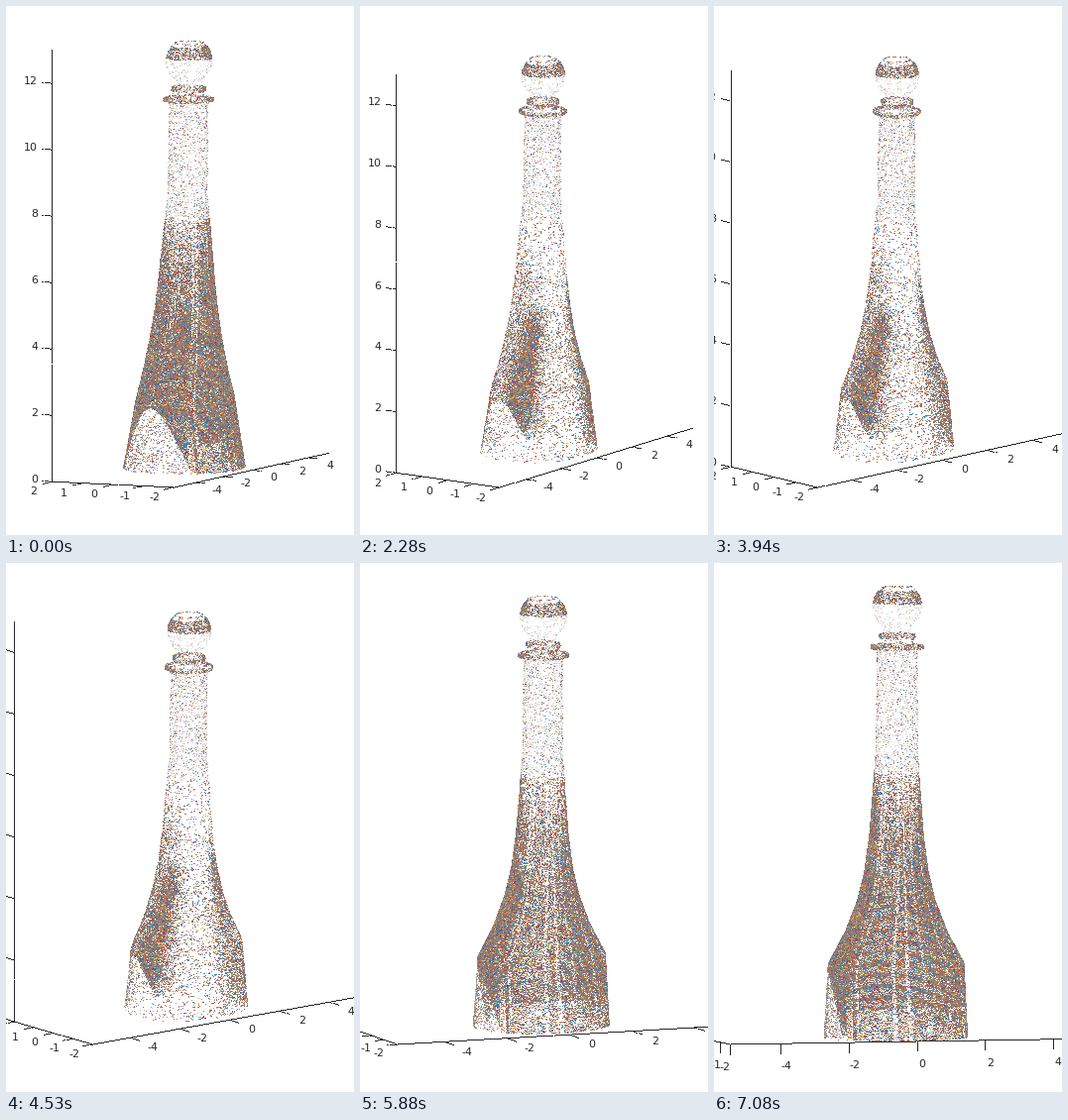
Recreate the animation shown at these times as a matplotlib script. Size 351 px wide and 534 px high, loop 8.56 s.

```python
import numpy as np
import matplotlib.pyplot as plt
from matplotlib.animation import FuncAnimation
from matplotlib.colors import to_rgb

W, H, DPI = 351, 534, 64
LOOP, INTERVAL = 8560, 40
START, STEP, MOVES = 792, 149.2, 43
XMAX, YMAX, ZMAX = 2, 5.5, 13
BOX_HEIGHT, CENTER_X, BOTTOM = 476, 186, 486
INK = "#262626"

# Camera path: time in ms, azimuth and elevation in degrees
KEY_T = [650, 1390, 3200, 4530, 5270, 6340, 7050]
KEY_AZ = [24.9, 29.6, 38.7, 52, 62, 72.8, 74.5]
KEY_EL = [5.9, 10.9, 13.1, 13.2, 11.3, 5.5, 3.3]

# Bottle outline: height, half width along x, half width along y
PROFILE = np.array([
    (0, 1.77, 2.05), (2.1, 1.34, 1.96), (3, 1.2, 1.46), (3.9, 1.07, 1.1),
    (4.7, .96, .9), (5.7, .85, .76), (7.05, .73, .66), (8.2, .59, .59),
    (10.85, .57, .57), (11.02, .62, .62), (11.05, .75, .75), (11.14, .75, .75),
    (11.18, .52, .52), (11.32, .46, .46), (11.36, .52, .52), (11.46, .5, .5),
    (11.5, .4, .4), (11.6, .39, .39)])

PALETTE = {
    "#83604f": .46, "#6f7078": .18, "#0072bd": .1, "#d95319": .11,
    "#edb120": .05, "#7e2f8e": .03, "#77ac30": .02, "#4dbeee": .03,
    "#a2142f": .02}


def bump(v, center, width):
    return np.exp(-((v - center) / width) ** 2)


def ramp(v, low, high):
    return np.clip((v - low) / (high - low), 0, 1)


def between(v, low, high, soft):
    return ramp(v, low, low + soft) * ramp(-v, -high, soft - high)


def make_bottle():
    """Surface points, colours and draw thresholds (steady, low-view extra)."""
    rng = np.random.default_rng(7)
    rows, cols = 420, 480
    z, deg = np.meshgrid(np.linspace(0, 12.8, rows),
                         np.arange(cols) * 360 / cols, indexing="ij")
    z = np.clip(z + rng.uniform(-.012, .012, z.shape), 0, 12.8)
    t = np.radians(deg)
    rx, ry = (np.interp(z, PROFILE[:, 0], PROFILE[:, i]) for i in (1, 2))
    ball = np.sqrt(np.clip(.69 ** 2 - (z - 12.25) ** 2, .15, None))
    rx, ry = np.where(z > 11.6, ball, rx), np.where(z > 11.6, ball, ry)
    x = rx * np.cos(t) + .17 * (1 - z / ZMAX)
    y = ry * np.sin(t)

    face = z < 1.95 * (1 - ((deg - 280) / 45) ** 2)
    neck = (z > 7.5) & (z < 11)
    near = between(deg, 95, 335, 15)
    steady = np.where(neck, .27, .09)
    steady += 2.4 * bump(deg, 250, 19) * between(z, .7, 5, .8)
    steady += .5 * bump(deg, 272, 32) * between(z, 1, 7, 1.5)
    steady += .8 * bump(deg, 155, 19) * between(z, .1, 5.8, 1)
    steady += .1 * near * ramp(-z, -5.5, -4)
    steady += .5 * near * (bump(z, 3.95, .02) + bump(z, 5.65, .02))
    extra = 2.1 * near * ramp(-z, -8, -5.8)
    extra *= np.where((z < .9) & (deg < 225), .45, 1)
    extra *= np.where(rng.random(cols // 4) < .15, .3, 1).repeat(4)
    steady[face], extra[face] = .1, .17

    # Collar, ring and stopper
    steady[(z > 11.02) & (z < 11.16)] = 1.2
    steady[(z > 11.33) & (z < 11.48)] = .9
    steady[(z > 11.5) & (z <= 12.3)] = .15
    cap = (z > 12.33) & (z < 12.7)
    steady[cap] = .1 + 1.5 * near[cap]
    steady[z > 12.78] = .9

    # Equal cover per pixel whatever the girth
    share = np.sqrt(rx * ry) / 3.6
    luck = rng.random((rows, cols // 3)).repeat(3, axis=1)
    luck = np.where(rng.random(luck.shape) < .6, luck, rng.random(luck.shape))

    colors = np.array([to_rgb(c) for c in PALETTE])
    pick = rng.choice(len(colors), (rows, cols // 3), p=list(PALETTE.values()))
    rgb = colors[pick.repeat(3, axis=1)]
    pale = .3 * rng.random((rows, cols))
    faded = (neck & (rng.random(z.shape) < .8)) | ((z > 11.5) & (z < 12.3))
    pale = np.where(faded, .5 + 1.4 * pale, np.where(face, 2 * pale, pale))
    rgb = rgb + (1 - rgb) * pale[..., None]

    keep = luck < (steady + extra) * share
    order = rng.permutation(keep.sum())
    return [a[keep][order] for a in
            (x, y, z, steady * share, extra * share, luck, rgb)]


class View:
    def __init__(self, time):
        az = np.radians(np.interp(time, KEY_T, KEY_AZ))
        self.elevation = np.interp(time, KEY_T, KEY_EL)
        el = np.radians(self.elevation)
        self.ca, self.sa = np.cos(az), np.sin(az)
        depth = 2 * (YMAX * self.ca + XMAX * self.sa)
        scale = BOX_HEIGHT / (ZMAX * np.cos(el) + np.sin(el) * depth)
        self.flat, self.rise = scale, scale * np.cos(el)
        self.tilt = scale * np.sin(el)
        self.floor = BOTTOM - self.tilt * depth / 2

    def project(self, x, y, z):
        return (CENTER_X + self.flat * (y * self.sa - x * self.ca),
                self.floor - self.rise * z
                - self.tilt * (x * self.sa + y * self.ca))

    def direction(self, x, y):
        a = np.array(self.project(x, y, 0)) - self.project(0, 0, 0)
        return a / np.hypot(*a)


TICKS = ([("x", v) for v in range(-2, 3)] + [("y", v) for v in range(-4, 5, 2)]
         + [("z", v) for v in range(0, 13, 2)])


def axis_parts(view):
    """Line segments of the axes and the place of every tick label."""
    corners = [(XMAX, -YMAX, ZMAX), (XMAX, -YMAX, 0),
               (-XMAX, -YMAX, 0), (-XMAX, YMAX, 0)]
    points = [view.project(*c) for c in corners]
    segments = list(zip(points[:-1], points[1:]))
    side_on = view.elevation < 4
    places = []
    for axis, value in TICKS:
        if axis == "x":
            at, out, gap = (value, -YMAX, 0), view.direction(0, -1), (-9, 8)
        elif axis == "y":
            at, out, gap = (-XMAX, value, 0), view.direction(-1, 0), (13, 7)
        else:
            at, out, gap = (XMAX, -YMAX, value), view.direction(1, 0), (-5, -2)
        if side_on and axis != "z":
            out, gap = np.array([0, 1]), (-5 if axis == "x" else 5, 13)
        start = np.array(view.project(*at))
        end = start + 10 * out
        segments.append((start, end))
        places.append(end + gap)
    return segments, places


def plot_pixels(image, x, y, color):
    x, y = np.floor(x).astype(int), np.floor(y).astype(int)
    inside = (x >= 0) & (x < W) & (y >= 0) & (y < H)
    image[y[inside], x[inside]] = color[inside]


X, Y, Z, STEADY, EXTRA, LUCK, RGB = make_bottle()


def paint(view, segments):
    image = np.ones((H, W, 3))
    for (x0, y0), (x1, y1) in segments:
        n = int(max(abs(x1 - x0), abs(y1 - y0))) + 1
        plot_pixels(image, np.linspace(x0, x1, n), np.linspace(y0, y1, n),
                    np.tile(to_rgb(INK), (n, 1)))
    low = np.clip((11.5 - view.elevation) / 5, 0, 1)
    shown = LUCK < STEADY + low * EXTRA
    px, py = view.project(X[shown], Y[shown], Z[shown])
    plot_pixels(image, px - 1, py, RGB[shown])
    return (image * 255).astype(np.uint8)


views = [View(0)] + [View(START + STEP * k) for k in range(MOVES)]
scenes = []
for v in views:
    lines, spots = axis_parts(v)
    scenes.append((paint(v, lines), spots))

fig = plt.figure(figsize=(W / DPI, H / DPI), dpi=DPI, facecolor="white")
ax = fig.add_axes([0, 0, 1, 1])
ax.axis("off")
picture = ax.imshow(scenes[0][0], extent=(0, W, H, 0), aspect="auto",
                    interpolation="nearest")
labels = [ax.text(0, 0, str(value), color=INK, fontsize=11 * 72 / DPI,
                  family="DejaVu Sans", va="center",
                  ha="right" if axis == "z" else "center")
          for axis, value in TICKS]


def update(i):
    time = (i + .75) * INTERVAL
    index = int(np.clip((time - START) // STEP + 1, 0, MOVES))
    image, places = scenes[index]
    picture.set_data(image)
    for label, place in zip(labels, places):
        label.set_position(place)
        label.set_visible(-10 < place[0] < W + 10)
    return [picture, *labels]


animation = FuncAnimation(fig, update, frames=LOOP // INTERVAL,
                          interval=INTERVAL, repeat=True, repeat_delay=0)
plt.show()
```
